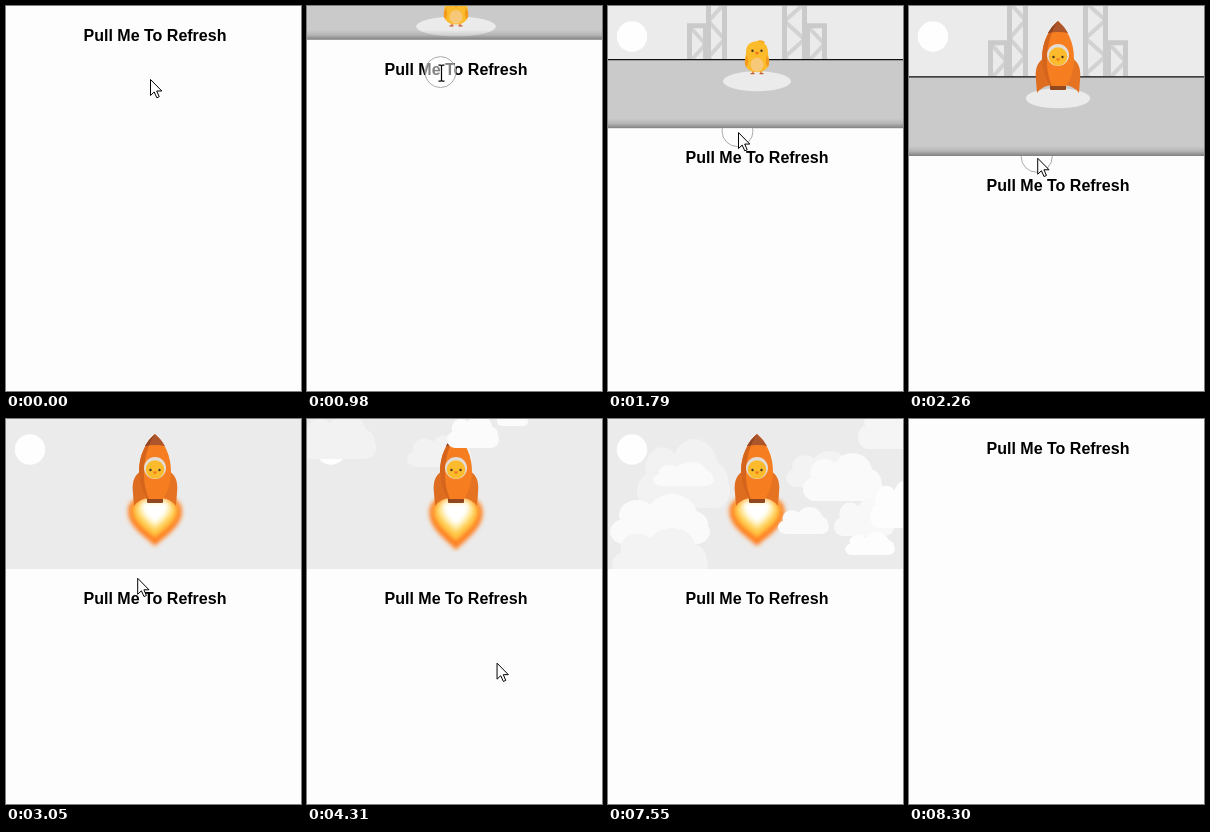
An HTML page for the animation above (8730 ms loop, 295 by 385 pixels).

```html
<!DOCTYPE html>
<html lang="en">
<head>
<meta charset="utf-8">
<title>Pull to refresh</title>
<style>
  html, body { margin: 0; width: 100%; height: 100%; overflow: hidden; background: #fdfdfd; }
  svg { display: block; width: 295px; height: 385px; }
  text { font: bold 16px Arial, "Liberation Sans", sans-serif; }
</style>
</head>
<body>
<svg viewBox="0 0 295 385">
  <defs>
    <linearGradient id="shade" x2="0" y2="1">
      <stop offset="0" stop-color="#666" stop-opacity="0"/>
      <stop offset=".5" stop-color="#666" stop-opacity=".2"/>
      <stop offset="1" stop-color="#666" stop-opacity=".75"/>
    </linearGradient>
    <filter id="soft" x="-30%" y="-30%" width="160%" height="160%"><feGaussianBlur stdDeviation="2"/></filter>
    <g id="cloud">
      <circle cx="27" cy="25" r="18"/>
      <circle cx="62" cy="25" r="25"/>
      <circle cx="82" cy="36" r="16"/>
      <rect y="30" width="100" height="30" rx="15"/>
    </g>
    <g id="face">
      <circle cx="-4.5" r="1.2" fill="#4a3320"/>
      <circle cx="4.5" r="1.2" fill="#4a3320"/>
      <path d="M-2.3 1.4H2.3L0 4.4Z" fill="#f0741c"/>
    </g>
  </defs>

  <rect width="295" height="150" fill="#ebebeb"/>
  <circle cx="24" cy="30.5" r="15.2" fill="#fefefe"/>
  <g id="farClouds"></g>

  <g id="pad">
    <g id="towers" fill="none" stroke="#cacaca" stroke-width="5"></g>
    <rect y="53" width="295" height="140" fill="#cacaca"/>
    <path d="M0 53.5H295" stroke="#111" stroke-width="1.2"/>
    <ellipse id="disc" cx="149" cy="75" ry="10" fill="#ebebeb"/>
  </g>

  <g id="chick">
    <path d="M145 64v3.5M142.5 67.5h4M153 64v3.5M151.5 67.5h4" stroke="#c9602a" stroke-width="1.3"/>
    <path d="M149 37q-1-3 3-3q3 0 5 2q-1 2-4 2z" fill="#f7a61f"/>
    <path d="M149 35C157 35 160 40 160 46C160 49 161 51 161 56C161 62 156 66 149 66C142 66 137 62 137 56C137 51 138 49 138 46C138 40 141 35 149 35Z" fill="#fcbb2b"/>
    <path d="M139 49Q135 55 138 61Q142 57 139 49ZM159 49Q163 55 160 61Q156 57 159 49Z" fill="#f39a1d"/>
    <ellipse cx="149" cy="58.5" rx="6.5" ry="7" fill="#f6c877"/>
    <use href="#face" x="149" y="44.5"/>
  </g>

  <g id="rocket">
    <g id="flame" filter="url(#soft)">
      <path d="M149 129C142 121 121 109 122 92C122 82 132 76 149 76C166 76 176 82 176 92C177 109 156 121 149 129Z" fill="#ff7d1a"/>
      <path d="M149 120C143 113 127 105 127 91Q129 78 149 78Q169 78 171 91C171 105 155 113 149 120Z" fill="#ffcb4a"/>
      <path d="M149 111C144 106 132 99 132 89Q136 79 149 79Q162 79 166 89C166 99 154 106 149 111Z" fill="#fff0a8"/>
      <path d="M149 105C144 101 136 96 136 84H162C162 96 154 101 149 105Z" fill="#fff"/>
    </g>
    <path d="M135 52C127 57 126 65 127 74L128 87Q134 79 144 79V56Z" fill="#df6d20"/>
    <path d="M163 52C171 57 172 65 171 74L170 87Q164 79 154 79V56Z" fill="#e57322"/>
    <rect x="141" y="77" width="16" height="7" rx="1" fill="#93471f"/>
    <path d="M149 15C159 24 165 37 165 53Q165 68 157 80H141Q133 68 133 53C133 37 139 24 149 15Z" fill="#f67e20"/>
    <path d="M149 15C139 24 133 37 133 53Q133 68 141 80H143Q137 66 138 50C139 36 143 24 149 15Z" fill="#d5651d"/>
    <path d="M149 15Q155 20 159 27Q149 25 139 27Q143 20 149 15Z" fill="#ad562b"/>
    <path d="M149 15Q143 20 139 27L143 26.3Q145 20 149 15Z" fill="#8f4522"/>
    <circle cx="149" cy="49" r="11" fill="#e3ddd5"/>
    <circle cx="149" cy="50.5" r="9.3" fill="#fbbb2c"/>
    <use href="#face" x="149" y="51"/>
  </g>
  <g id="nearClouds"></g>

  <rect id="edge" width="295" height="10" fill="url(#shade)"/>
  <g id="page">
    <rect width="295" height="386" fill="#fdfdfd"/>
    <text x="149" y="35" text-anchor="middle">Pull Me To Refresh</text>
  </g>
  <clipPath id="below"><rect id="belowBox" width="295" height="385"/></clipPath>
  <g clip-path="url(#below)">
    <circle id="ring" r="15.5" fill="#fff" fill-opacity=".5" stroke="#aaa"/>
  </g>
  <path id="arrow" d="M.5.5V16.5L4.2 13L6.8 18.8L9.2 17.7L6.7 12H11.8Z" fill="#fff" stroke="#000"/>
  <path id="beam" d="M-3-8H-1Q0-8 0-7Q0-8 1-8H3M0-7V7M-3 8H-1Q0 8 0 7Q0 8 1 8H3" fill="none" stroke="#000" stroke-width="1.2"/>
</svg>
<script>
const LOOP = 8730, FULL = 150, LAUNCH = 3050, CLOSE = 7600, CLOSE_TIME = 650;
const PRESS = 650, RELEASE = 2490, GRAB_Y = 44.5, CLOUD_SPEED = 0.09;
const $ = id => document.getElementById(id);
const clamp = (v, lo, hi) => Math.min(hi, Math.max(lo, v));
const move = (el, x, y) => el.setAttribute('transform', `translate(${x} ${y})`);
const show = (el, on) => el.setAttribute('visibility', on ? 'visible' : 'hidden');

// pointer: time, x, y
const track = [
  [80, 144, 73], [470, 132, GRAB_Y], [PRESS, 132, GRAB_Y], [980, 134, 67],
  [1500, 131, 103], [1790, 130, 126], [2100, 128.5, 148], [2400, 128, 155],
  [2960, 128, 155], [3870, 160, 193], [4810, 223, 301], [5480, 257, 390]
];

function pointer(t) {
  if (t <= track[0][0]) return track[0].slice(1);
  const i = track.findIndex(k => k[0] > t);
  if (i < 0) return track[track.length - 1].slice(1);
  const a = track[i - 1], b = track[i], p = (t - a[0]) / (b[0] - a[0]);
  return [a[1] + (b[1] - a[1]) * p, a[2] + (b[2] - a[2]) * p];
}

// the CSS "ease" curve, cubic-bezier(.25,.1,.25,1)
function ease(x) {
  let lo = 0, hi = 1;
  const curve = (u, a, b) => 3 * u * (1 - u) ** 2 * a + 3 * u * u * (1 - u) * b + u ** 3;
  for (let i = 0; i < 20; i++) {
    const mid = (lo + hi) / 2;
    if (curve(mid, .25, .25) < x) lo = mid; else hi = mid;
  }
  return curve(lo, .1, 1);
}

// clouds: x, y, width, height, fill; y holds at the time given for the bank
const banks = [
  { at: 5590, far: [[-8, 110, 77, 45, '#f2f2f2'], [100, 131, 65, 32, '#f2f2f2']],
    near: [[190, 103, 31, 19, '#fbfbfb'], [140, 111, 52, 33, '#fbfbfb']] },
  { at: 7550, far: [[29, 20, 93, 69, '#f2f2f2'], [45, 43, 61, 24, '#fafafa'],
      [178, 32, 70, 36, '#f3f3f3'], [250, -18, 70, 48, '#f5f5f5']],
    near: [[2, 75, 100, 50, '#fafafa'], [4, 109, 96, 48, '#f3f3f3'],
      [195, 34, 80, 48, '#fafafa'], [226, 79, 60, 38, '#f8f8f8'],
      [262, 61, 60, 48, '#fdfdfd'], [170, 88, 51, 27, '#fafafa'],
      [237, 113, 50, 23, '#fdfdfd']] }
];
const drawBank = clouds => '<g>' + clouds.map(([x, y, w, h, fill]) =>
  `<use href="#cloud" fill="${fill}" transform="translate(${x} ${y}) scale(${w / 100} ${h / 60})"/>`).join('') + '</g>';
for (const [id, layer] of [['farClouds', 'far'], ['nearClouds', 'near']])
  $(id).innerHTML = banks.map(b => drawBank(b[layer])).join('');

function tower(x, top, w) {
  const l = x + 2.5, r = x + w - 2.5;
  let braces = '';
  for (let y = top + 3, flip = false; y < 53; y += 18, flip = !flip)
    braces += `M${flip ? r : l} ${y}L${flip ? l : r} ${y + 18}`;
  return `<path d="${braces}" stroke="#d2d2d2" stroke-width="4"/><path d="M${l} 53V${top + 2.5}H${r}V53"/>`;
}
$('towers').innerHTML = tower(79, 17, 21) + tower(98, -24, 21) + tower(174, -24, 25) + tower(197, 17, 22);

function draw(t) {
  const [px, py] = pointer(t);
  const flying = t >= LAUNCH;
  const pull = t < PRESS ? 0
    : t < CLOSE ? (t > 2400 ? FULL : clamp(1.5 * (py - GRAB_Y), 0, FULL))
    : FULL * (1 - ease(clamp((t - CLOSE) / CLOSE_TIME, 0, 1)));

  move($('pad'), 0, .618 * (pull - 122));
  $('disc').setAttribute('rx', 42.2 - .067 * pull);
  move($('chick'), 0, .54 * (pull - 122));
  move($('rocket'), 0, flying ? 0 : -4 * (FULL - pull));
  for (const id of ['pad', 'chick', 'edge']) show($(id), !flying);

  show($('flame'), flying);
  const sx = 1 + .02 * Math.sin(t / 70), sy = 1 + .04 * Math.sin(t / 45);
  $('flame').setAttribute('transform', `translate(149 78) scale(${sx} ${sy}) translate(-149 -78)`);

  for (const id of ['farClouds', 'nearClouds']) {
    show($(id), flying);
    banks.forEach((b, i) => move($(id).children[i], 0, CLOUD_SPEED * (t - b.at)));
  }

  move($('edge'), 0, pull - 10);
  show($('edge'), !flying && pull > 0);
  move($('page'), 0, pull);
  $('belowBox').setAttribute('y', pull);

  const overTitle = py > pull + 20 && py < pull + 39;
  show($('ring'), t >= PRESS && t < RELEASE);
  move($('ring'), px - .5, py - 1);
  move($('arrow'), px, py);
  move($('beam'), px + .5, py);
  show($('arrow'), !overTitle && t < 5480);
  show($('beam'), overTitle && t < 5480);
}

function tick() {
  draw(performance.now() % LOOP);
  requestAnimationFrame(tick);
}
tick();
</script>
</body>
</html>
```
